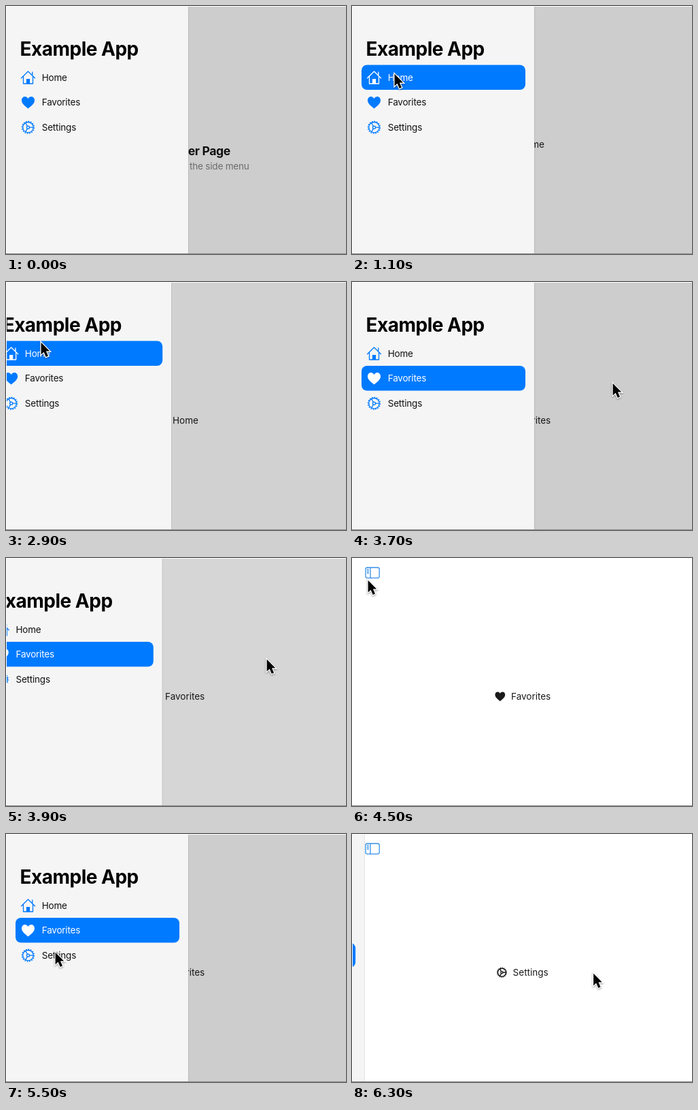
Recreate the animation shown at these times as an HTML page. Size 500 by 364 pixels, loop 6.5 s.

```html
<!DOCTYPE html>
<html lang="en">
<head>
<meta charset="utf-8">
<title>Side menu</title>
<style>
  html, body { margin: 0; width: 100%; height: 100%; overflow: hidden; background: #fff; }
  svg { display: block; width: 500px; height: 364px; }
  text { font: 13.5px Inter, sans-serif; letter-spacing: -.2px; fill: currentColor; }
  .page text { letter-spacing: 0; }
  .title { font-size: 28px; font-weight: 700; letter-spacing: -.5px; }
  .heading { font-size: 17.5px; font-weight: 700; letter-spacing: -.3px; text-anchor: end; }
  .hint { fill: #868686; text-anchor: end; }
</style>
</head>
<body>
<svg viewBox="0 0 500 364">
  <defs>
    <g id="home">
      <path d="M-10 .8 0-9 10 .8M-7-1.5V9H7V-1.5M6.3-3.5V-8" fill="none" stroke="currentColor" stroke-linecap="round" stroke-linejoin="round"/>
      <path d="M-2.6 9V2H2.6V9Z" fill="currentColor"/>
    </g>
    <path id="heart" fill="currentColor" d="M0 9C-5 5-9.5 1.5-9.5-3C-9.5-9-2.5-10.5 0-5.5C2.5-10.5 9.5-9 9.5-3C9.5 1.5 5 5 0 9Z"/>
    <g id="gear" fill="none" stroke="currentColor">
      <circle r="8.9" stroke-width="1.5" pathLength="32" stroke-dasharray="1 1"/>
      <circle r="7.7"/>
      <circle r="2"/>
      <path d="M2 0H7.7M-1-1.7-3.9-6.7M-1 1.7-3.9 6.7"/>
    </g>
  </defs>

  <g id="pages" color="#1a1a1a" stroke-width="1.8">
    <g color="#111">
      <text class="heading" x="330" y="219">Placeholder Page</text>
      <text class="hint" x="357.5" y="239.5">Select a page from the side menu</text>
    </g>
  </g>
  <g fill="none" stroke="#3591ea" stroke-width="1.3">
    <rect x="20" y="14" width="20.2" height="15.3" rx="2.5"/>
    <path d="M27 14V29.3M22 17H24.8M22 19.5H24.8M22 22H24.8"/>
  </g>
  <rect id="dim" width="500" height="364"/>

  <g id="menu">
    <rect width="268" height="364" fill="#f5f5f5"/>
    <path d="M268.3 0V364" stroke="#000" stroke-opacity=".1"/>
    <text class="title" x="20.5" y="73">Example App</text>
    <rect id="highlight" x="14" width="241" height="36.6" rx="8" fill="#007aff"/>
  </g>

  <g id="cursor">
    <path d="M.6 1.8V19.4L4.6 15.7 7.8 23 11 21.6 7.9 14.6H13.2Z" stroke="#fff" stroke-width="2.6" paint-order="stroke"
      style="filter: drop-shadow(0 1px 1px #0006)"/>
  </g>
  <path d="M.5 364V.5H500" fill="none" stroke="#fff"/>
  <path d="M0 363.5H500" stroke="#8c8c8c"/>
</svg>
<script>
const LOOP = 6500, STEP = 200, SLIDE = 400, TRAVEL = 400, MENU_WIDTH = 268;
const $ = id => document.getElementById(id);

const items = [
  { label: 'Home', icon: 'home', textX: 245 },
  { label: 'Favorites', icon: 'heart', textX: 234 },
  { label: 'Settings', icon: 'gear', textX: 236.6 }
];
const rowY = i => 105 + 36.6 * i;

const selectTimes = [700, 3300, 5700];
const toggleTimes = [1725, 2681, 3880, 4600, 6063]; // close, open, close, ...

const button = { x: 23, y: 31 };
const stops = [
  { at: 100, x: 150, y: 58 },
  { at: 700, x: 62, y: 98 },
  { at: 1700, x: 307.5, y: 125 },
  { at: 2500, ...button },
  { at: 3100, x: 79, y: 143 },
  { at: 3700, x: 383, y: 147 },
  { at: 4500, ...button },
  { at: 5500, x: 72, y: 172 },
  { at: 6100, x: 354.5, y: 203 }
];

const clamp = v => Math.min(1, Math.max(0, v));
const smooth = u => u * u * (3 - 2 * u);
const countPast = (times, t) => times.filter(time => t >= time).length;

const row = ({ icon, label }, iconX, textX, y, scale) =>
  `<use href="#${icon}" transform="translate(${iconX} ${y}) scale(${scale})"/>
   <text x="${textX}" y="${y + 4.8}">${label}</text>`;

items.forEach((item, i) => {
  $('pages').insertAdjacentHTML('beforeend',
    `<g class="page">${row(item, item.textX - 16.2, item.textX, 203.2, .78)}</g>`);
  $('menu').insertAdjacentHTML('beforeend',
    `<g class="item" stroke-width="1.3">${row(item, 32.5, 52.7, rowY(i), 1)}</g>`);
});
const pages = [...$('pages').children];
const rows = [...document.querySelectorAll('.item')];

function menuOpenness(t) {
  const toggles = countPast(toggleTimes, t);
  if (!toggles) return 1;
  const rest = (1 - clamp((t - toggleTimes[toggles - 1]) / SLIDE)) ** 3;
  return toggles % 2 ? rest : 1 - rest;
}

// Each move ends at its stop's time and takes TRAVEL ms.
function cursorAt(t) {
  let { x, y } = stops[0];
  for (const stop of stops) {
    const k = smooth(clamp(1 + (t - stop.at) / TRAVEL));
    x += (stop.x - x) * k;
    y += (stop.y - y) * k;
  }
  return `translate(${x} ${y})`;
}

const show = (element, visible) => element.style.display = visible ? '' : 'none';

function draw(now) {
  // The picture advances in steps of 200 ms, the first one lasting 100 ms.
  const t = Math.max(0, Math.floor((now % LOOP + 100) / STEP) * STEP - 100);
  const openness = menuOpenness(t);
  const selected = countPast(selectTimes, t) - 1;

  pages.forEach((page, i) => show(page, i === selected + 1));
  rows.forEach(({ children: [icon, label] }, i) => {
    icon.style.color = i === selected ? '#fff' : '#007aff';
    label.style.color = i === selected ? '#fff' : '#111';
  });
  show($('highlight'), selected >= 0);
  $('highlight').setAttribute('y', rowY(selected) - 18.6);
  show($('menu'), openness > 0);
  $('menu').setAttribute('transform', `translate(${MENU_WIDTH * (openness - 1)} 0)`);
  // The shade darkens in even gray levels.
  $('dim').setAttribute('fill-opacity', Math.floor(11.2 * openness) / 56);
  show($('cursor'), t >= stops[0].at);
  $('cursor').setAttribute('transform', cursorAt(t));
}

const start = performance.now();
function tick() {
  draw(performance.now() - start);
  requestAnimationFrame(tick);
}
tick();
</script>
</body>
</html>
```
